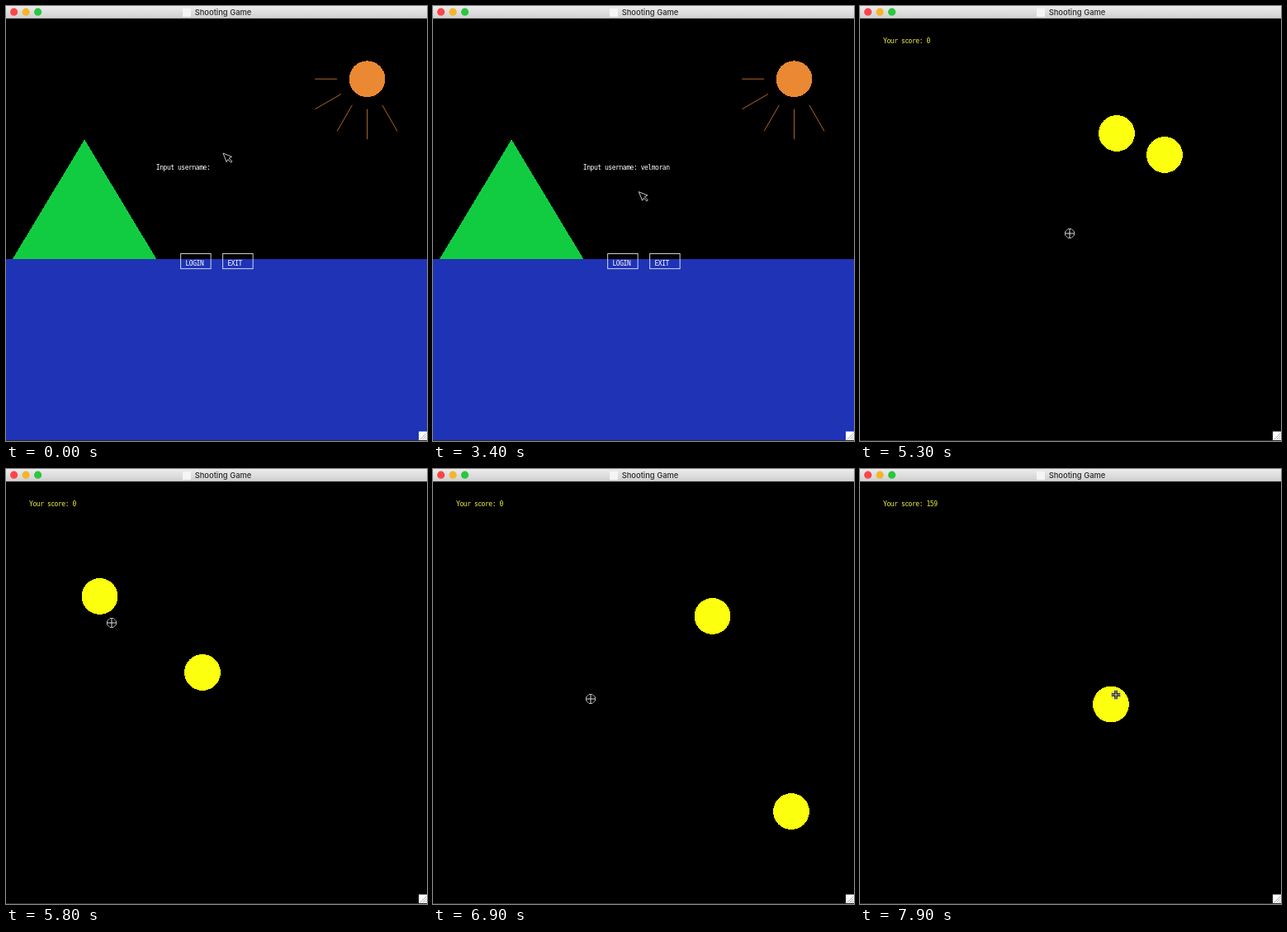
These frames come from a looping animation (510 by 526 pixels, 8000 ms). An HTML page:

```html
<!DOCTYPE html>
<html lang="en">
<head>
<meta charset="utf-8">
<title>Shooting Game</title>
<style>
html, body { margin: 0; width: 100%; height: 100%; overflow: hidden; background: #000; }
svg { display: block; width: 510px; height: 526px; }
text { font: 11px "DejaVu Sans Mono", monospace; letter-spacing: -.62px; fill: #fff; }
.title { font: 500 9.4px Inter, sans-serif; letter-spacing: 0; fill: #2a2a2a; text-anchor: middle; }
.box { fill: none; stroke: #fff; stroke-width: 1.1; }
.crisp { shape-rendering: crispEdges; }
#score { fill: #eef545; }
</style>
</head>
<body>
<svg viewBox="0 0 510 526">
  <defs>
    <linearGradient id="bar" x2="0" y2="1">
      <stop stop-color="#ececec"/><stop offset="1" stop-color="#d0d0d0"/>
    </linearGradient>
  </defs>
  <rect width="510" height="526"/>

  <!-- The game window is 700 units square -->
  <g transform="translate(.4 15) scale(.7286)">
    <g id="scene">
      <rect class="crisp" x="-1" y="400" width="702" height="300" fill="#1e33b5"/>
      <path class="crisp" d="M130 201L250 400H10Z" fill="#11cc41"/>
      <circle class="crisp" cx="600" cy="100.5" r="30" fill="#eb8833"/>
      <path id="rays" stroke="#c8742c" stroke-width="1.2"/>
    </g>
    <g id="login"><text id="prompt" x="249" y="251"></text></g>
    <g id="menu"></g>
    <text id="score" x="38" y="40.5"></text>
  </g>

  <g id="balls" class="crisp" fill="#fcff0d"><circle r="21.9"/><circle r="21.9"/></g>
  <path id="arrow" d="M0 0L10.5 4.3L7 6.2L11 10L9.5 11.3L5.8 7.6L4.2 10.6Z" stroke="#ddd" stroke-width=".9"/>
  <g id="aim" fill="none">
    <path d="M-5 0H5M0-5V5" stroke="#000" stroke-width="3.4"/>
    <path d="M-2-5.5H2L5.5-2V2L2 5.5H-2L-5.5 2V-2Z" stroke="#bbb"/>
    <path d="M-5 0H5M0-5V5" stroke="#ddd"/>
  </g>

  <rect width="510" height="15" fill="url(#bar)"/>
  <path d="M0 14.8H510" stroke="#a8a8a8" stroke-width=".6"/>
  <g id="lights"></g>
  <rect x="214" y="3" width="10" height="10" fill="#f5f5f5"/>
  <text class="title" x="263" y="11">Shooting Game</text>
  <rect x="500" y="514.5" width="10" height="10.5" fill="#fff"/>
  <path d="M501.5 524.5l8-8M504.5 524.5l5-5M507.5 524.5l2-2" stroke="#999" stroke-width=".8"/>
  <path d="M0 525.5H510" stroke="#2a2a2a"/>
</svg>
<script>
const LOOP = 8000, STEP = 100;
const MENU = 4200, ROUND_1 = 5300, ROUND_2 = 6800, HIT = 7600;
const NAME = "velmoran";
const $ = id => document.getElementById(id);

const label = (x, y, s) => `<text x="${x}" y="${y}">${s}</text>`;
const button = (x, y, w, h, pad, drop, s) =>
  `<rect class="box" x="${x}" y="${y}" width="${w}" height="${h}"/>` + label(x + pad, y + drop, s);

$("login").insertAdjacentHTML("beforeend",
  ["LOGIN", "EXIT"].map((s, i) => button(290 + i * 70, 390.5, 50, 25, 8, 20, s)).join(""));

$("menu").innerHTML =
  [`Username: ${NAME}`, "Your Highest Scores:", "LEVEL 1: 614", "LEVEL 2: 707", "LEVEL 3: 743"]
    .map((s, i) => label(38, 40.5 + i * 40, s)).join("") +
  ["LEVEL 1", "LEVEL 2", "LEVEL 3", "Ranking", "Return"]
    .map((s, i) => button(300, 210.5 + i * 60, 100, 40, 27.5, 26.5, s)).join("");

$("lights").innerHTML = ["#fb4649", "#f4b52d", "#2bc740"]
  .map((c, i) => `<circle cx="${9.6 + i * 14.5}" cy="7.2" r="4.6" fill="${c}"/>`).join("");

// Five rays, 30 degrees apart, cut off at a common left edge
const rayPoint = (angle, r) =>
  `${Math.max(513, 600 + r * Math.cos(angle))} ${100.5 + r * Math.sin(angle)}`;
$("rays").setAttribute("d", [2, 3, 4, 5, 6]
  .map(i => `M${rayPoint(i * Math.PI / 6, 50)}L${rayPoint(i * Math.PI / 6, 100)}`).join(""));

// Where the pointer turns
const POINTER = [
  { t: 3100, x: 263, y: 178 },
  { t: 4000, x: 222, y: 318 },
  { t: 4300, x: 222, y: 318 },
  { t: 4600, x: 230, y: 302 },
  { t: 5300, x: 254, y: 275 },
  { t: 5800, x: 128, y: 186 },
  { t: 6900, x: 191, y: 278 },
  { t: 7500, x: 106, y: 190 },
  { t: 7900, x: 310, y: 273 }
];

// Each round launches two balls; speeds are per step
const ROUNDS = [
  { start: ROUND_1, balls: [{ x: 311, y: 154, vx: -39.5, vy: 0 }, { x: 369, y: 180, vx: -26.2, vy: 13.2 }] },
  { start: ROUND_2, balls: [{ x: 378, y: 176, vx: -39.5, vy: 2 }, { x: 447, y: 427, vx: -13, vy: -12.95 }] }
];

function pointerAt(t) {
  const i = POINTER.findLastIndex(p => p.t <= t);
  const a = POINTER[Math.max(i, 0)], b = POINTER[i + 1] ?? a;
  const k = a === b ? 0 : (t - a.t) / (b.t - a.t);
  return [a.x + (b.x - a.x) * k, a.y + (b.y - a.y) * k];
}

const show = (el, on) => el.style.display = on ? "" : "none";
const move = (el, x, y) => el.setAttribute("transform", `translate(${x} ${y})`);

function draw(t) {
  const playing = t >= ROUND_1;
  for (const id of ["scene", "arrow"]) show($(id), !playing);
  for (const id of ["score", "balls", "aim"]) show($(id), playing);
  show($("login"), t < MENU);
  show($("menu"), t >= MENU && !playing);
  move($(playing ? "aim" : "arrow"), ...pointerAt(t));

  const typed = Math.max(0, Math.floor((t - 300) / 350) + 1);
  $("prompt").textContent = "Input username: " + NAME.slice(0, typed);
  $("score").textContent = "Your score: " + (t < HIT ? 0 : 159);

  const { start, balls } = ROUNDS[t < ROUND_2 ? 0 : 1];
  const n = (t - start) / STEP;
  balls.forEach((b, i) => move($("balls").children[i], b.x + b.vx * n, b.y + b.vy * n));
  show($("balls").children[0], t < HIT);
}

const begin = performance.now();
function tick() {
  const t = (performance.now() - begin) % LOOP;
  draw(Math.floor(t / STEP) * STEP);
  requestAnimationFrame(tick);
}
tick();
</script>
</body>
</html>
```
